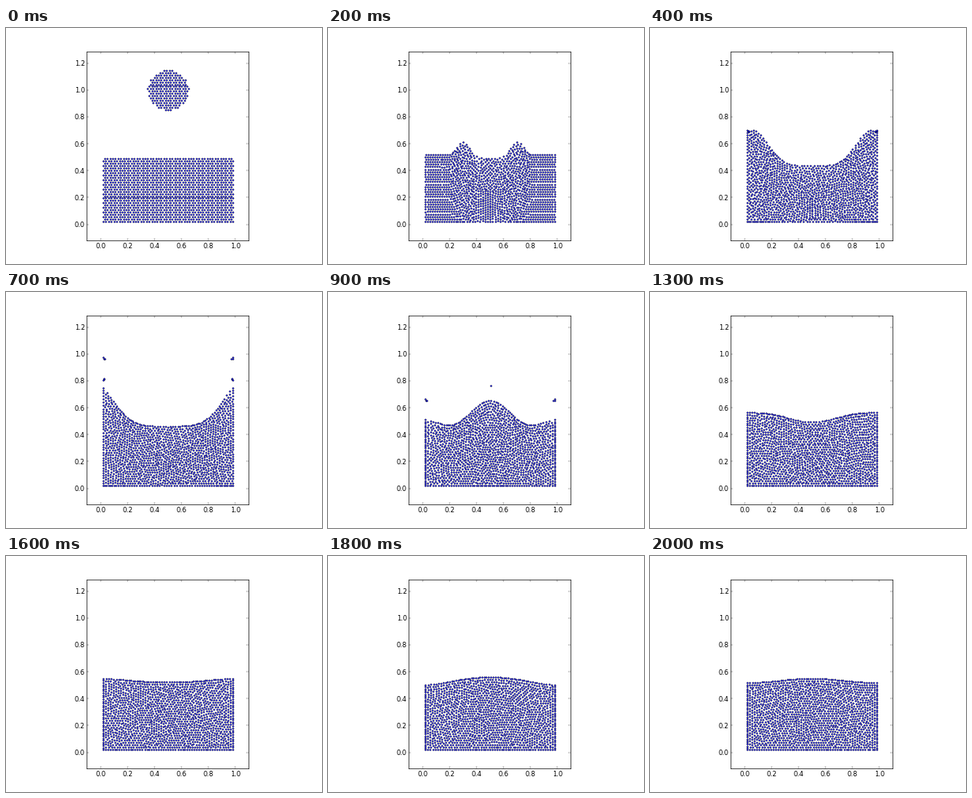
Animation of 400x300 px, one loop 2100 ms. Source, as a matplotlib script:

```python
import numpy as np
import matplotlib.pyplot as plt
from matplotlib.animation import FuncAnimation

FRAMES, INTERVAL = 21, 100
WALL, GAP, LEVEL = 0.02, 0.02, 0.533
DROP_Y, DROP_R, DROP_V = 1.0, 0.151, 0.2
G = 0.098  # gravity per step squared

rng = np.random.default_rng(4)
grid = np.linspace(WALL, 1 - WALL, 481)
floor = np.full_like(grid, WALL)
off = np.abs(grid - 0.5)


def rim(t):
    """Crater rim that runs from the impact out to the walls and grows."""
    r = 0.6 * (1 - np.exp(-0.455 * (t - 1.1)))
    ridge = np.exp(-((off - r) / (0.36 * r)) ** 2)
    shelf = np.where(off > r, np.maximum(ridge, 0.25), ridge)
    return 0.6 * r * shelf


def mode(n, size, decay, start, period, t):
    """Damped standing wave with n crests across the basin."""
    swing = np.exp(-decay * (t - start)) * np.cos(2 * np.pi * (t - start) / period)
    return size * swing * np.cos(2 * np.pi * n * grid)


def slosh(t):
    return mode(1, -0.075, 0.1, 9.7, 9, t) + mode(2, 0.05, 0.35, 9, 6, t)


def surface(t):
    mix = np.clip((t - 7) / 2, 0, 1)
    wave = (1 - mix) * rim(t) + mix * slosh(t)
    return LEVEL + wave - wave.mean()


def share(lo, hi):
    area = np.cumsum(np.maximum(hi - lo, 1e-9))
    return (area - area[0]) / (area[-1] - area[0])


def transport(p, lo, hi, new_lo, new_hi):
    """Carry points from one layer to another, keeping their share of the area."""
    x, y = p.T
    bottom, top = np.interp(x, grid, lo), np.interp(x, grid, hi)
    v = np.clip((y - bottom) / np.maximum(top - bottom, 1e-3), 0, 1)
    u = np.interp(x, grid, share(lo, hi))
    x = np.interp(u, share(new_lo, new_hi), grid)
    bottom, top = np.interp(x, grid, new_lo), np.interp(x, grid, new_hi)
    return np.column_stack([x, bottom + v * (top - bottom)])


def relax(p, top, rounds=3, steps=6, reach=0.0225):
    """Push crowded points apart inside the basin."""
    n = len(p)
    for _ in range(rounds):
        x, y = p.T
        near = (x[:, None] - x) ** 2 + (y[:, None] - y) ** 2 < (1.3 * reach) ** 2
        i, j = np.nonzero(np.triu(near, 1))
        for _ in range(steps):
            d = p[i] - p[j]
            dist = np.hypot(*d.T) + 1e-6
            push = d * (0.2 * np.maximum(reach - dist, 0) / dist)[:, None]
            for k in (0, 1):
                p[:, k] += np.bincount(i, push[:, k], n) - np.bincount(j, push[:, k], n)
            p[:, 0] = np.clip(p[:, 0], WALL, 1 - WALL)
            p[:, 1] = np.clip(p[:, 1], WALL, np.interp(p[:, 0], grid, top))
    return p


def lattice():
    rows = []
    for k in range(68):
        x = np.arange(WALL + k % 2 * GAP / 2, 1 - WALL + 1e-6, GAP)
        rows.append(np.column_stack([x, np.full_like(x, WALL + k * GAP * 0.75 ** 0.5)]))
    return np.vstack(rows)


def make_spray():
    """Loose drops as x, y, speed and the step at which they are there."""
    drops = [(0.507, 0.765, 0.12, 9)]
    for y in (0.967, 0.811):
        for dx, dy in rng.uniform(0, 0.012, (3, 2)):
            drops += [(x, y + dy - 0.006, -0.057, 7)
                      for x in (WALL + dx, 1 - WALL - dx)]
    return drops


def airborne(spray, t):
    top = surface(t)
    for x, y0, v, t0 in spray:
        s = t - t0
        y = y0 + v * s - G * s * s / 2
        if y > np.interp(x, grid, top):
            yield x, y


def simulate():
    pts = lattice()
    pool = pts[pts[:, 1] < 0.495]
    drop = pts[np.hypot(pts[:, 0] - 0.5, pts[:, 1] - DROP_Y) < DROP_R]
    states = [np.vstack([pool, drop]),
              np.vstack([pool, drop - [0, DROP_V + G / 2]])]

    # The drop sinks into the pool as a lens under the new surface
    chord = np.sqrt(np.maximum(DROP_R ** 2 - off ** 2, 0))
    lens = 0.24 * np.sqrt(np.maximum(1 - (off / 0.19) ** 2, 0))
    still = np.full_like(grid, pool[:, 1].max())
    top = surface(2)
    p = np.vstack([
        transport(pool, floor, still, floor, top - lens),
        transport(drop, DROP_Y - chord, DROP_Y + chord, top - lens, top)])
    p = relax(p + rng.normal(0, 0.001, p.shape), top)
    states.append(p.copy())

    spray = make_spray()
    for t in range(3, FRAMES):
        old, top = top, surface(t)
        p = relax(transport(p, floor, old, floor, top), top)
        loose = list(airborne(spray, t)) if t > 3 else []
        states.append(np.vstack([p, np.reshape(loose, (-1, 2))]))
    return states


states = simulate()

plt.rcParams.update({"font.family": "DejaVu Sans", "font.size": 12})
fig = plt.figure(figsize=(8, 6), dpi=50, facecolor="white")
ax = fig.add_axes([0.25625, 0.1, 0.51, 0.8])
ax.set(xlim=(-0.1, 1.094), ylim=(-0.12, 1.285),
       xticks=np.arange(0, 1.1, 0.2), yticks=np.arange(0, 1.3, 0.2))
ax.xaxis.set_major_formatter("{x:.1f}")
ax.yaxis.set_major_formatter("{x:.1f}")
ax.tick_params(direction="in", length=4, width=0.5, pad=4, top=True, right=True)
for side in ax.spines.values():
    side.set_linewidth(1)
dots, = ax.plot([], [], "o", ms=2.7, mfc="blue", mec="black", mew=0.6)


def draw(n):
    dots.set_data(*states[n].T)
    return dots,


anim = FuncAnimation(fig, draw, frames=FRAMES, interval=INTERVAL,
                     repeat=True, repeat_delay=0, blit=False)
plt.show()
```
